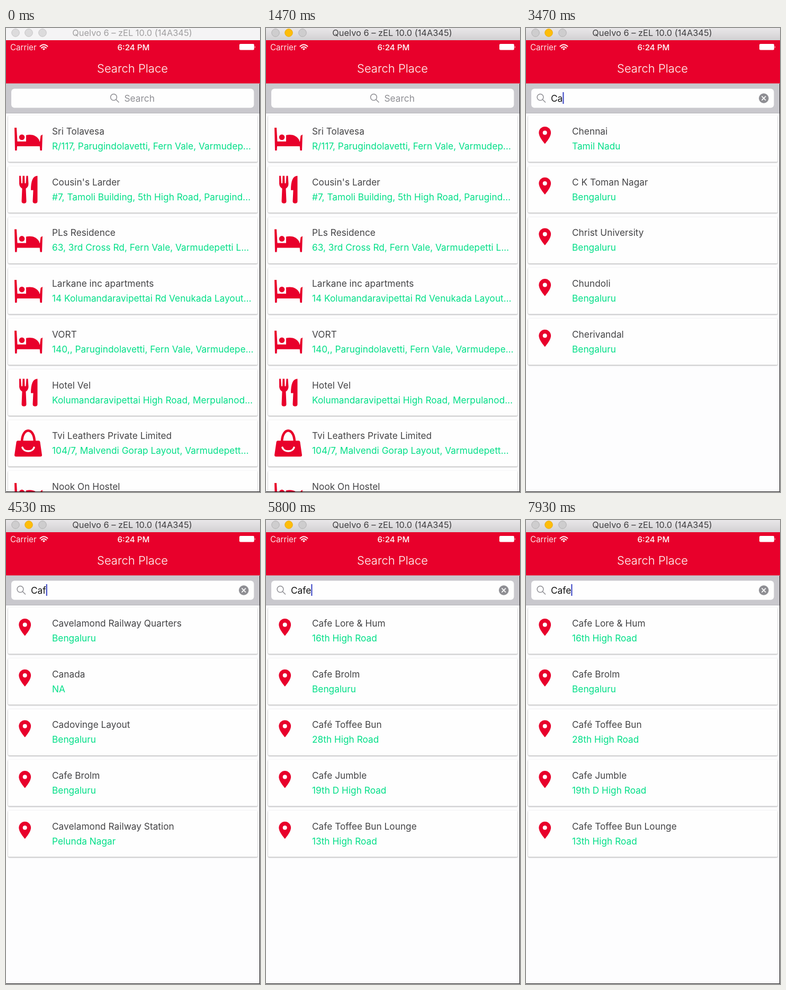
Recreate the animation shown at these times as an HTML page. Size 480 by 875 pixels, loop 8000 ms.

```html
<!DOCTYPE html>
<html lang="en">
<head>
<meta charset="utf-8">
<title>Search Place</title>
<style>
  html, body { margin: 0; width: 100%; height: 100%; overflow: hidden; background: #fdfdfe; }
  svg { display: block; width: 480px; height: 875px; font-family: Inter, Roboto, sans-serif; }
  .red { fill: #e8002b; }
  .card { fill: #fefefe; filter: drop-shadow(0 1px 1px rgba(0, 0, 0, .36)); }
  .name { fill: #444446; font-size: 17.3px; }
  .place { fill: #02df88; font-size: 17.3px; }
  .field { font-size: 17.3px; }
  .grey { fill: #8e8e93; }
  .line { fill: none; stroke-linecap: round; }
  .mid { text-anchor: middle; }
  .light { fill: #dcdbdc; stroke: #c6c5c6; }
  #bar { fill: #f5f4f5; }
  #windowTitle { fill: #a09fa0; font-size: 16.4px; }
  .active #bar { fill: url(#chrome); }
  .active #windowTitle { fill: #3f3e40; }
  .active .light { fill: #cecdce; stroke: #b3b2b3; }
  .active #minimise { fill: #fdbd0a; stroke: #e9ab10; }
</style>
</head>
<body>
<svg id="stage" viewBox="0 0 480 875">
  <defs>
    <linearGradient id="chrome" x2="0" y2="1">
      <stop stop-color="#e9e7e9"/><stop offset="1" stop-color="#d2d0d2"/>
    </linearGradient>
    <g id="bed" class="red">
      <path d="M16 23h4l1.5 26H64l1.500-11 3.500-2-1 30h-3.500l-.8-8H21l-.5 8H17z"/>
      <path d="M38 37c10-2 20 0 25 10v3H38z"/>
      <circle cx="30" cy="41" r="5.300"/>
    </g>
    <g id="food" class="red">
      <path d="M25 18h3l1 14h2l.5-14h3.500l.5 14h2l1-14h3l1 15q0 6-5 9l1 24q0 4-4.500 4t-4.500-4l1-24q-5-3-5.500-9z"/>
      <path d="M59.500 18C51 18 47 27 47 45h4.500l-1 21q0 4 4.500 4t4.500-4z"/>
    </g>
    <g id="bag">
      <path class="line" d="M30 41C31 13 53 13 54 41" stroke="#e8002b" stroke-width="4.600"/>
      <path class="red" d="M22 39H62q2 0 2.500 3L68 66q0 3-3 3H19q-3 0-3-3l3.500-24q.5-3 2.500-3z"/>
      <path class="line" d="M31 52C34 61 50 61 53 52" stroke="#fff" stroke-width="3.600"/>
    </g>
    <g id="pin">
      <path class="red" d="M35.700 21a11.400 11.400 0 0 1 11.400 11.400c0 8.600-11.400 21-11.400 21s-11.400-12.400-11.400-21A11.400 11.400 0 0 1 35.700 21z"/>
      <circle cx="35.700" cy="32.400" r="4" fill="#fff"/>
    </g>
  </defs>

  <rect width="480" height="875" fill="#fdfdfe"/>
  <g id="lists"></g>

  <rect id="bar" width="480" height="23"/>
  <circle class="light" cx="18" cy="9" r="7.300"/>
  <circle class="light" id="minimise" cx="43" cy="9" r="7.300"/>
  <circle class="light" cx="69" cy="9" r="7.300"/>
  <text id="windowTitle" class="mid" x="238.500" y="15">Quelvo 6 – zEL 10.0 (14A345)</text>

  <rect class="red" y="23" width="480" height="82"/>
  <g fill="#fff">
    <text x="8" y="41.500" font-size="15.200" opacity=".9">Carrier</text>
    <text class="mid" x="241" y="41.500" font-size="15.200" font-weight="500">6:24 PM</text>
    <text class="mid" x="239" y="83.500" font-size="22" font-weight="300">Search Place</text>
    <g class="line" stroke="#fff" stroke-width="2" stroke-linecap="butt">
      <path d="M64.500 34.500q7-6.500 14 0M67 37.500q4.500-4 9 0"/>
    </g>
    <path d="M71.500 42l-2.600-2.800q2.600-2 5.200 0z"/>
    <rect x="441" y="30" width="28" height="11.500" rx="2"/>
    <path d="M470 34q2 2 0 4z"/>
  </g>

  <rect y="104.500" width="480" height="56" fill="#c9c8cd"/>
  <rect y="160" width="480" height="1" fill="#b5b4b9"/>
  <rect x="10" y="114.500" width="458.500" height="36" rx="6" fill="#fefefe"/>
  <g id="lens" class="line" stroke="#8e8e93" stroke-width="1.500">
    <circle cx="203.500" cy="130.500" r="5.900"/><path d="M208 135l5 5"/>
  </g>
  <text id="hint" class="field grey" x="223.500" y="138.500">Search</text>
  <text id="query" class="field" x="47" y="138.500" fill="#111"></text>
  <rect id="caret" y="121" width="2.200" height="22" fill="#4650c8"/>
  <g id="clear">
    <circle class="grey" cx="449.300" cy="132.500" r="9.300"/>
    <path class="line" d="M446 129.200l6.600 6.600m0-6.600l-6.600 6.600" stroke="#fff" stroke-width="1.700"/>
  </g>
  <path d="M479.500 105V874.500H0" fill="none" stroke="#161416"/>
</svg>
<script>
  const LOOP = 8000, PITCH = 95.7, ACTIVATE = 500, FOCUS = 2200, SLIDE = 250;
  const $ = id => document.getElementById(id);

  // Each row: name | place | icon (pin when omitted)
  const lists = [
    { at: 0, rows: [
      "Sri Tolavesa|R/117, Parugindolavetti, Fern Vale, Varmudep...|bed",
      "Cousin's Larder|#7, Tamoli Building, 5th High Road, Parugind...|food",
      "PLs Residence|63, 3rd Cross Rd, Fern Vale, Varmudepetti L...|bed",
      "Larkane inc apartments|14 Kolumandaravipettai Rd Venukada Layout...|bed",
      "VORT|140,, Parugindolavetti, Fern Vale, Varmudepe...|bed",
      "Hotel Vel|Kolumandaravipettai High Road, Merpulanod...|food",
      "Tvi Leathers Private Limited|104/7, Malvendi Gorap Layout, Varmudepett...|bag",
      "Nook On Hostel||bed"] },
    { at: 3270, rows: [
      "Chennai|Tamil Nadu", "C K Toman Nagar|Bengaluru", "Christ University|Bengaluru",
      "Chundoli|Bengaluru", "Cherivandal|Bengaluru"] },
    { at: 3870, rows: [
      "Cavelamond Railway Quarters|Bengaluru", "Canada|NA", "Cadovinge Layout|Bengaluru",
      "Cafe Brolm|Bengaluru", "Cavelamond Railway Station|Pelunda Nagar"] },
    { at: 5070, rows: [
      "Cafe Lore &amp; Hum|16th High Road", "Cafe Brolm|Bengaluru", "Café Toffee Bun|28th High Road",
      "Cafe Jumble|19th D High Road", "Cafe Toffee Bun Lounge|13th High Road"] }
  ];
  const keys = [2930, 3400, 4270, 4730];

  const rowMarkup = (row, i) => {
    const [name, place, icon = "pin"] = row.split("|");
    return `<g transform="translate(0 ${165 + i * PITCH})">
      <rect class="card" x="4" width="471.500" height="87.500" rx="2"/>
      <use href="#${icon}"/>
      <text class="name" x="87" y="36">${name}</text>
      <text class="place" x="87" y="64">${place}</text></g>`;
  };
  $("lists").innerHTML = lists.map(l => `<g>${l.rows.map(rowMarkup).join("")}</g>`).join("");
  const groups = [...$("lists").children];

  const show = (el, on) => { el.style.display = on ? "" : "none"; };
  const last = (times, t) => times.filter(at => at <= t).length;

  function render(t) {
    $("stage").classList.toggle("active", t >= ACTIVATE);

    const current = last(lists.map(l => l.at), t) - 1;
    groups.forEach((g, i) => show(g, i === current));

    const p = Math.min(1, Math.max(0, (t - FOCUS) / SLIDE));
    const shift = `translate(${-176.5 * p * p * (3 - 2 * p)} 0)`;
    $("lens").setAttribute("transform", shift);
    $("hint").setAttribute("transform", shift);

    const typed = last(keys, t);
    $("query").textContent = "Cafe".slice(0, typed);
    show($("hint"), !typed);
    show($("clear"), typed);

    // The caret restarts its one-second blink on every key press.
    const since = t - (typed ? keys[typed - 1] : FOCUS);
    show($("caret"), since >= 0 && since % 1000 < 500);
    $("caret").setAttribute("x", 47 + (typed ? $("query").getComputedTextLength() : 0));
  }

  const start = performance.now();
  function tick() {
    render((performance.now() - start) % LOOP);
    requestAnimationFrame(tick);
  }
  tick();
</script>
</body>
</html>
```
